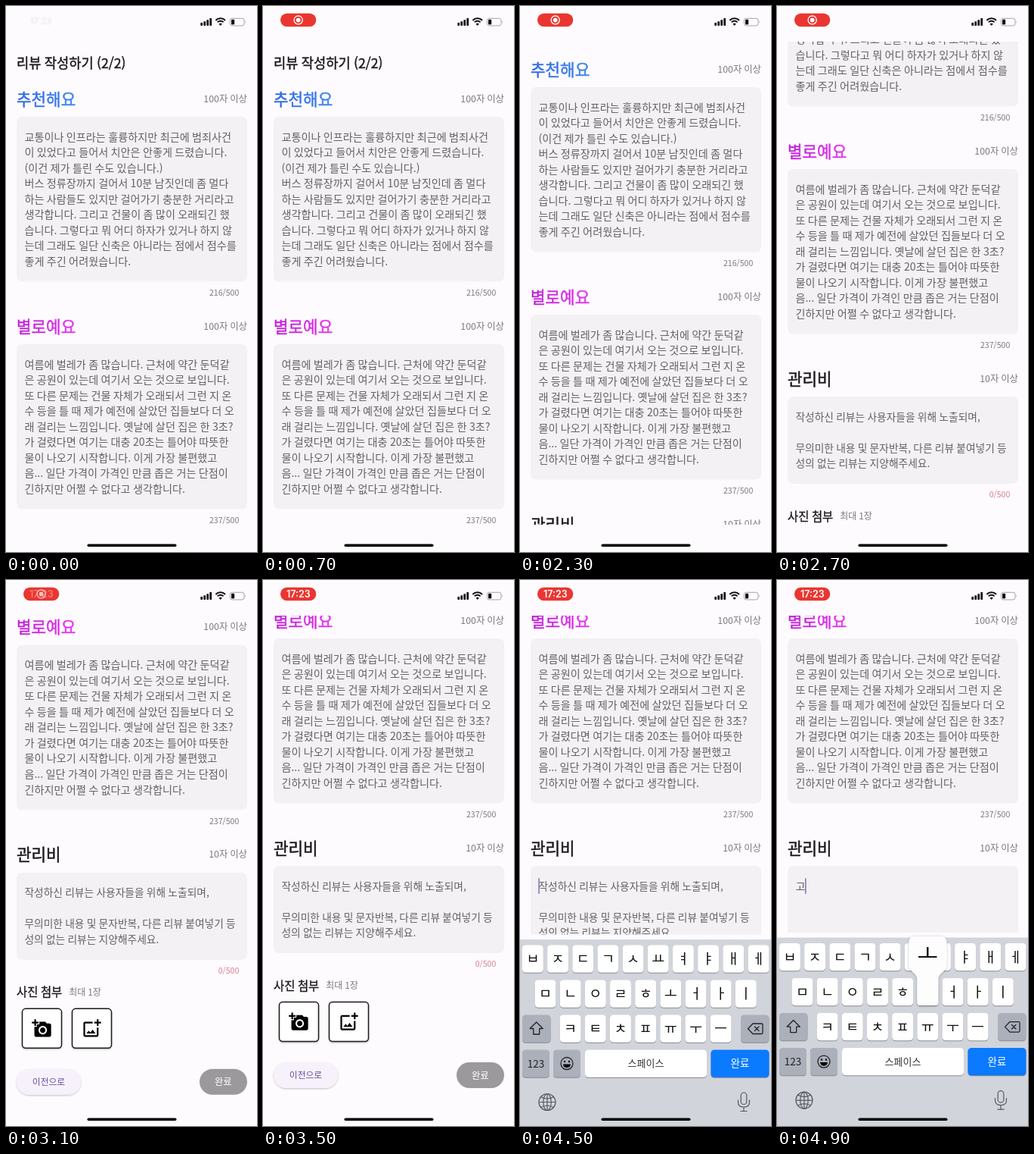
An HTML page for the animation above (5 s loop, 332 px wide and 720 px high).

```html
<!DOCTYPE html>
<html lang="ko">
<head>
<meta charset="utf-8">
<style>
html, body { margin: 0; width: 100%; height: 100%; overflow: hidden; background: #fefbfe; }
svg { display: block; width: 100vw; height: 100vh; }
text { font-family: 'Noto Sans CJK KR', 'Noto Sans KR', 'Noto Sans CJK', sans-serif; white-space: pre; word-spacing: -.046em; }
.time { font-family: Inter, sans-serif; font-weight: 600; }
</style>
</head>
<body>
<svg id="stage" viewBox="0 0 332 720"></svg>
<script>
const LOOP = 5000, STEP = 100;
const LINE = 20.52, BODY = 14.17, HINT = 13.75, SMALL = 12.39;
const INK = '#636164', GREY = '#7b797c', DARK = '#1c1b1f', PURPLE = '#6750a4';

const good = `교통이나 인프라는 훌륭하지만 최근에 범죄사건
이 있었다고 들어서 치안은 안좋게 드렸습니다.
(이건 제가 틀린 수도 있습니다.)
버스 정류장까지 걸어서 10분 남짓인데 좀 멀다
하는 사람들도 있지만 걸어가기 충분한 거리라고
생각합니다. 그리고 건물이 좀 많이 오래되긴 했
습니다. 그렇다고 뭐 어디 하자가 있거나 하지 않
는데 그래도 일단 신축은 아니라는 점에서 점수를
좋게 주긴 어려웠습니다.`;
const bad = `여름에 벌레가 좀 많습니다. 근처에 약간 둔덕같
은 공원이 있는데 여기서 오는 것으로 보입니다.
또 다른 문제는 건물 자체가 오래되서 그런 지 온
수 등을 틀 때 제가 예전에 살았던 집들보다 더 오
래 걸리는 느낌입니다. 옛날에 살던 집은 한 3초?
가 걸렸다면 여기는 대충 20초는 틀어야 따뜻한
물이 나오기 시작합니다. 이게 가장 불편했고
음... 일단 가격이 가격인 만큼 좁은 거는 단점이
긴하지만 어쩔 수 없다고 생각합니다.`;
const hint = `작성하신 리뷰는 사용자들을 위해 노출되며,

무의미한 내용 및 문자반복, 다른 리뷰 붙여넣기 등
성의 없는 리뷰는 지양해주세요.`;

const text = (x, y, s, size, fill, more = '') =>
  `<text x="${x}" y="${y}" font-size="${size}" fill="${fill}" ${more}>${s}</text>`;
const medium = (x, y, s, size, fill) =>
  text(x, y, s, size, fill, `stroke="${fill}" stroke-width="${size * .024}"`);
const box = (x, y, w, h, r, fill, more = '') =>
  `<rect x="${x}" y="${y}" width="${w}" height="${h}" rx="${r}" fill="${fill}" ${more}/>`;
const END = 'text-anchor="end"', MID = 'text-anchor="middle"';

// one titled text field with its counter
function section(y, title, fill, limit, body, size, count, countFill, id) {
  const lines = body.split('\n');
  const h = lines.length * LINE + 32.8;
  return medium(14, y + 130.5, title, 21.25, fill) +
    text(319, y + 126.6, limit, SMALL, GREY, END) +
    box(14, y + 146, 305, h, 7, '#f3f1f4') +
    `<g id="${id}">` + lines.map((s, i) =>
      text(24.4, y + 177.5 + i * LINE, s, size, INK)).join('') + '</g>' +
    text(308.4, y + h + 164.4, count, 10.62, countFill, END);
}

const tile = (x, icon) =>
  box(x, 925.5, 52, 52, 4.5, '#fff', 'stroke="#1a1a1a" stroke-width="1.5" filter="url(#soft)"') +
  `<path transform="translate(${x + 12.7} 938.3) scale(1.108)" d="${icon}"/>`;
const cameraIcon = 'M3 4V1h2v3h3v2H5v3H3V6H0V4h3zm3 6V7h3V4h7l1.83 2H21c1.1 0 2 .9 2 2v12c0 1.1-.9 2-2 2H5c-1.1 0-2-.9-2-2V10h3zm7 9c2.76 0 5-2.24 5-5s-2.24-5-5-5-5 2.24-5 5 2.24 5 5 5zm-3.2-5c0 1.77 1.43 3.2 3.2 3.2s3.2-1.43 3.2-3.2-1.43-3.2-3.2-3.2-3.2 1.43-3.2 3.2z';
const pictureIcon = 'M18 20H4V6h9V4H4c-1.1 0-2 .9-2 2v14c0 1.1.9 2 2 2h14c1.1 0 2-.9 2-2v-9h-2v9zm-7.79-3.17l-1.96-2.36L5.5 18h11l-3.54-4.71zM20 4V1h-2v3h-3v2h3v3h2V6h3V4h-3z';

const page = medium(14, 82, '리뷰 작성하기 (2/2)', 17.7, DARK) +
  section(0, '추천해요', 'url(#blue)', '100자 이상', good, BODY, '216/500', GREY, 'good') +
  section(300, '별로예요', 'url(#pink)', '100자 이상', bad, BODY, '237/500', GREY, 'bad') +
  section(600, '관리비', DARK, '10자 이상', hint, HINT, '0/500', '#d3808e', 'hint') +
  text(24.4, 777.5, '', BODY, INK, 'id="typed"') +
  box(24.3, 762, 1.6, 21, .8, PURPLE, 'id="caret"') +
  medium(14, 909.5, '사진 첨부', 15.4, DARK) +
  text(83.3, 908.3, '최대 1장', 12, GREY) +
  tile(21.5, cameraIcon) + tile(87.5, pictureIcon) +
  box(14, 1005, 85, 34, 17, '#f7f1fb', 'filter="url(#soft)"') +
  text(56.5, 1026.4, '이전으로', 11.8, PURPLE, MID) +
  box(256, 1005, 63, 34, 17, '#9c999d') +
  text(287.3, 1026.5, '완료', SMALL, '#fff', MID);

// keyboard
const PITCH = 33.17, KEY_W = 27.9, KEY_H = 36.2, SHADE = '#abb0bb';
const key = (x, y, w, fill = '#fff') =>
  box(x, y + 1, w, KEY_H, 4.4, '#898b90') + box(x, y, w, KEY_H, 4.4, fill);
const row = (letters, x, y) => [...letters].map((c, i) =>
  key(x + i * PITCH - KEY_W / 2, y, KEY_W) +
  text(x + i * PITCH, y + 24.5, c, 18.5, '#111', MID)).join('');
const line = d =>
  `<path d="${d}" fill="none" stroke="#222" stroke-width="1.3" stroke-linejoin="round" stroke-linecap="round"/>`;

const keyboard = box(0, 471.5, 332, 250, 0, '#d1d4da') +
  row('ㅂㅈㄷㄱㅅㅛㅕㅑㅐㅔ', 16.9, 479) +
  row('ㅁㄴㅇㄹㅎㅗㅓㅏㅣ', 33.5, 525) +
  row('ㅋㅌㅊㅍㅠㅜㅡ', 66.6, 571) +
  key(3, 571, 37.5, SHADE) + key(292, 571, 37.5, SHADE) +
  line('M21.7 580.5l8.5 8.5h-4.5v7.5h-8v-7.5h-4.5z') +
  line('M308 582.5h11.5q1.5 0 1.5 1.5v10.5q0 1.5-1.5 1.5h-11.5l-6.5-6.7z') +
  line('M310.5 586.5l5.5 5.5m0-5.5l-5.5 5.5') +
  key(3, 617, 36, SHADE) + key(44, 617, 36, SHADE) +
  key(86, 617, 161) + key(252.5, 617, 77, '#0a7aff') +
  text(21, 640, '123', 13.5, '#222', MID) +
  text(166.5, 639.5, '스페이스', 13, '#333', MID) +
  text(291, 639.5, '완료', 13.5, '#fff', MID) +
  '<circle cx="62" cy="635" r="8" fill="none" stroke="#222" stroke-width="1.3"/>' +
  '<circle cx="59" cy="632.5" r="1.2"/><circle cx="65" cy="632.5" r="1.2"/>' +
  '<path d="M57 636h10q-.6 4.6-5 4.6t-5-4.6z"/>' +
  '<g fill="none" stroke="#555a62" stroke-width="1.2">' +
  '<circle cx="36" cy="686" r="11"/><ellipse cx="36" cy="686" rx="5.2" ry="11"/>' +
  '<path d="M25 686h22M36 675v22M27.5 679q8.5 5 17 0M27.5 693q8.5-5 17 0"/>' +
  '<rect x="292.2" y="673.5" width="7.6" height="15.5" rx="3.8"/>' +
  '<path d="M288.5 683v3q0 6.5 7.5 6.5t7.5-6.5v-3M296 692.5v5.5M291.5 698h9"/></g>' +
  '<g id="popup"></g>';

// enlarged key; x is the key centre, y the key top
const popup = (c, x, y) =>
  `<path fill="#fdfdfe" filter="url(#lift)" d="M${x - 17} ${y - 55}h34q8 0 8 8v30c0 9-11 9-11 19v30q0 4-4 4h-20q-4 0-4-4v-30c0-10-11-10-11-19v-30q0-8 8-8z"/>` +
  text(x, y - 22, c, 30, '#111', MID);

const arc = r =>
  `<path d="M${283.7 - r * .72} ${25.3 - r * .72}a${r} ${r} 0 0 1 ${r * 1.44} 0" fill="none" stroke="#111" stroke-width="2"/>`;
const status =
  text(46, 24, '17:23', 11.5, '#ece9ec', `class="time" id="ghost" filter="url(#blur)" ${MID}`) +
  `<g id="pill">${box(23, 9.8, 47.3, 17.5, 8.75, '#ea3630')}` +
  '<g id="record" fill="#fff"><circle cx="46.7" cy="18.6" r="5.6" fill="none" stroke="#fff" stroke-width="1.3"/><circle cx="46.7" cy="18.6" r="2.9"/></g>' +
  text(46.9, 23.2, '17:23', 12.5, '#fff', `class="time" id="clock" ${MID}`) + '</g>' +
  [4, 5.7, 7.8, 10].map((h, i) => box(257.3 + i * 4, 26 - h, 2.8, h, .7, '#111')).join('') +
  arc(8.8) + arc(5.4) + '<path d="M281.5 23.7q2.2-1.8 4.4 0l-2.2 2.4z" fill="#111"/>' +
  box(296.5, 16.3, 18.5, 9.7, 2.8, 'none', 'stroke="#a5a3a6"') +
  box(298, 17.8, 4.2, 6.7, 1.3, '#111') +
  '<path d="M316.3 19.3q1.5 1.8 0 3.6z" fill="#a5a3a6"/>';

const gradient = (id, a, b) =>
  `<linearGradient id="${id}"><stop stop-color="${a}"/><stop offset="1" stop-color="${b}"/></linearGradient>`;
const shadow = (id, dy, blur, o) =>
  `<filter id="${id}" x="-30%" y="-30%" width="160%" height="160%"><feDropShadow dx="0" dy="${dy}" stdDeviation="${blur}" flood-opacity="${o}"/></filter>`;

document.getElementById('stage').innerHTML = '<defs>' +
  gradient('blue', '#2f66e6', '#4288ee') + gradient('pink', '#bd22d6', '#e63af0') +
  shadow('soft', 1, .9, .25) + shadow('lift', .5, 1.8, .3) +
  '<filter id="blur"><feGaussianBlur stdDeviation="1"/></filter>' +
  '<clipPath id="view"><rect id="port" x="0" y="47" width="332" height="637"/></clipPath></defs>' +
  box(0, 0, 332, 720, 0, '#fefbfe') +
  `<g clip-path="url(#view)"><g id="page">${page}</g></g>` + status +
  `<g id="keys">${keyboard}</g>` + box(107.5, 709.5, 118, 3.6, 1.8, '#000');

const el = id => document.getElementById(id);
const clamp = v => Math.max(0, Math.min(1, v));
const span = (t, a, b) => clamp((t - a) / (b - a));
const show = (id, v) => el(id).setAttribute('opacity', +v);

// drag up, then glide to the end of the page
const scrollAt = t => 231 * span(t, 2100, 2700) ** 1.62 +
  138 * (1 - (1 - span(t, 2700, 3367)) ** 3);

let last = -1;
function draw(t) {
  el('page').setAttribute('transform', `translate(0 ${-scrollAt(t)})`);

  const red = span(t, 100, 500), swap = span(t, 3000, 3300);
  show('pill', red);
  show('ghost', 1 - red);
  show('record', 1 - swap);
  show('clock', swap);

  const drop = t < 4050 ? 249 : 248.5 * Math.exp((4050 - t) / 98);
  el('keys').setAttribute('transform', `translate(0 ${drop})`);
  el('port').setAttribute('height', Math.min(684, 465 + drop) - 47);

  const typed = t >= 4900 ? '고' : t >= 4800 ? 'ㄱ' : '';
  el('typed').textContent = typed;
  show('hint', !typed);
  el('caret').setAttribute('x', typed ? 37 : 24.3);
  show('caret', t >= 4000 ? .75 : 0);
  el('popup').innerHTML = t >= 4900 ? popup('ㅗ', 199.4, 525)
    : t >= 4700 ? popup('ㄱ', 116.4, 479) : '';
}

function tick(now) {
  const t = Math.floor(now % LOOP / STEP) * STEP;
  if (t !== last) draw(last = t);
  requestAnimationFrame(tick);
}
draw(0);
requestAnimationFrame(tick);
</script>
</body>
</html>
```
